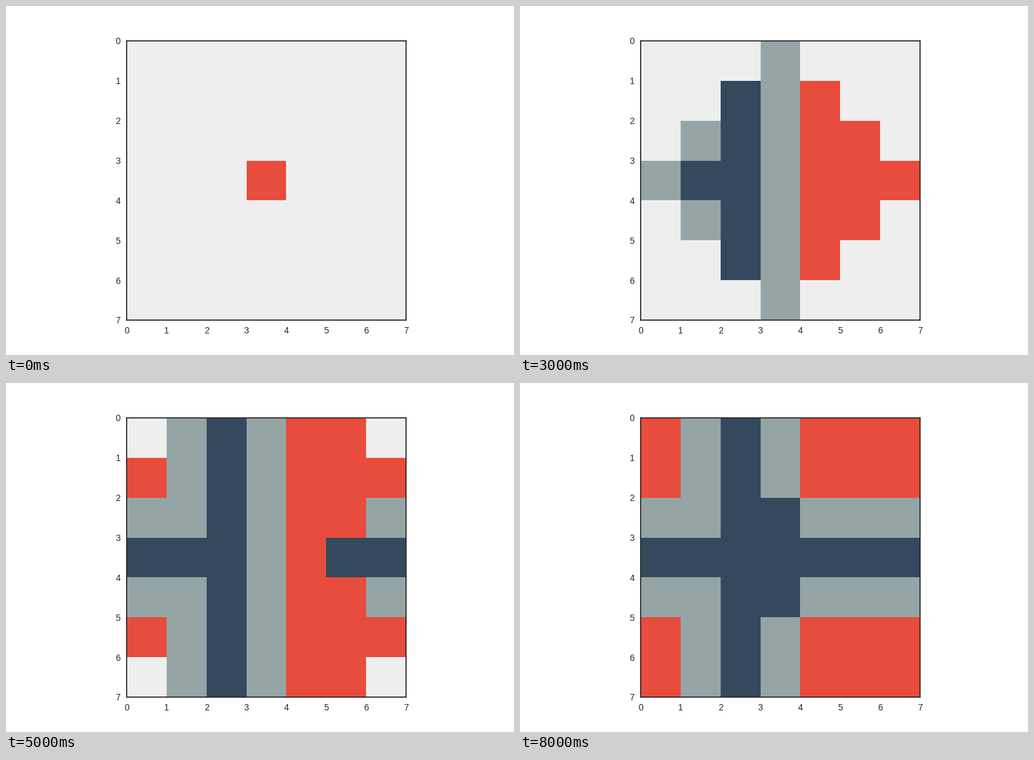
These frames come from a looping animation (800 px wide and 550 px high, 10000 ms). A matplotlib script:

```python
import matplotlib.pyplot as plt
import numpy as np
from matplotlib.animation import FuncAnimation
from matplotlib.colors import ListedColormap

SIZE = 7
MID = SIZE // 2
LAST_STEP = 8
EMPTY, GREY, RED, BLUE = range(4)
COLORS = ListedColormap(["#eeeeee", "#95a5a6", "#e74c3c", "#34495e"])
INK = "0.15"

plt.rcParams.update({
    "font.family": "Liberation Sans",
    "font.size": 10,
    "axes.edgecolor": INK,
    "axes.linewidth": 1.25,
    "xtick.color": INK,
    "ytick.color": INK,
    "xtick.major.size": 0,
    "ytick.major.size": 0,
    "xtick.major.pad": 7,
    "ytick.major.pad": 7,
})


def cell(row, col, step):
    """State of one cell after the given number of steps."""
    off = abs(row - MID)
    dist = off + abs(col - MID)
    if dist > step:
        return EMPTY
    if step == 0:
        return RED

    # Second wave, running back from the right edge
    if col >= MID:
        if off == 0 and col >= 10 - step:
            return BLUE if step > 4 else GREY
        if off == 1 and col >= 11 - step:
            return BLUE if col == MID else GREY

    # First wave, spreading from the centre as a diamond
    if col > MID:
        return RED
    if col == MID:
        return GREY
    if off == 0:
        return GREY if dist == step else BLUE
    if col == 2:
        return BLUE
    return RED if col == 0 and off > 1 else GREY


def grid(step):
    return np.array([[cell(r, c, step) for c in range(SIZE)]
                     for r in range(SIZE)])


fig, ax = plt.subplots(figsize=(8, 5.5), dpi=100, facecolor="white")
fig.subplots_adjust(left=0.125, right=0.9, bottom=0.1, top=0.9)
mesh = ax.pcolormesh(grid(0), cmap=COLORS, vmin=-0.5, vmax=3.5)
ax.set(xlim=(0, SIZE), ylim=(SIZE, 0), aspect="equal",
       xticks=range(SIZE + 1), yticks=range(SIZE + 1))


def update(frame):
    mesh.set_array(grid(min(frame, LAST_STEP)))
    return [mesh]


anim = FuncAnimation(fig, update, frames=10, interval=1000,
                     repeat=True, repeat_delay=0)
plt.show()
```
